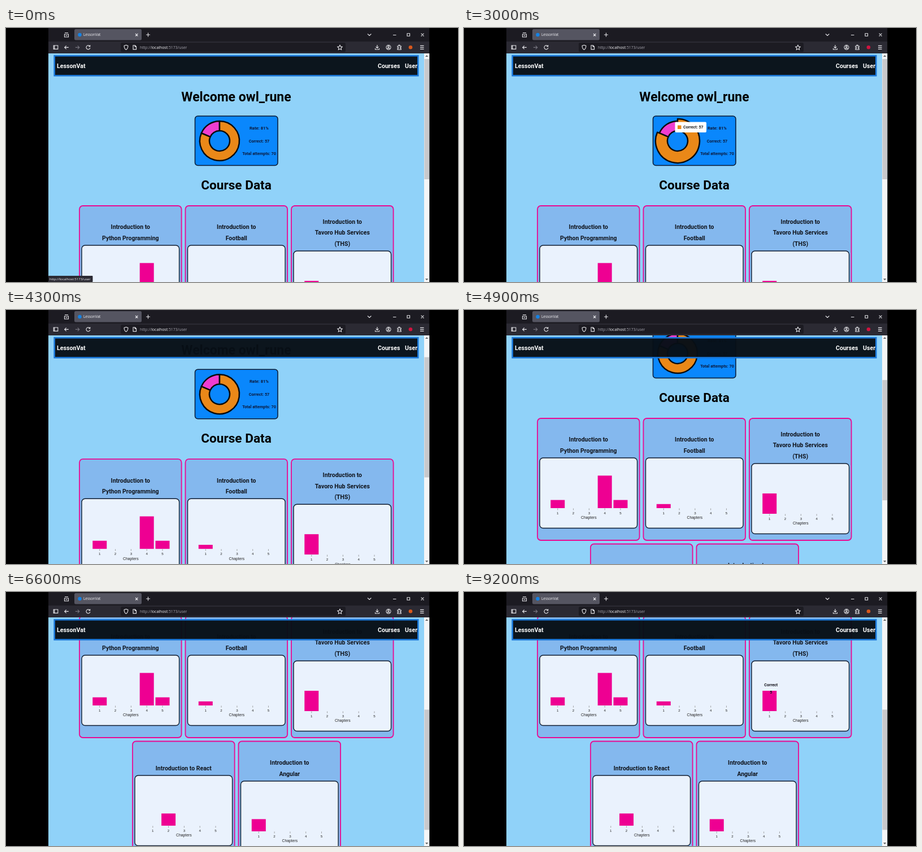
Recreate the animation shown at these times as an HTML page. Size 800 by 450 pixels, loop 9300 ms.

```html
<!DOCTYPE html>
<html lang="en">
<head>
<meta charset="utf-8">
<title>Course dashboard</title>
<style>
  html, body { margin: 0; width: 100%; height: 100%; overflow: hidden; background: #000; }
  svg { display: block; width: 800px; height: 450px; }
  text { font-family: Roboto, sans-serif; font-weight: 700; white-space: pre; }
  .ui { font-family: "Open Sans", sans-serif; font-weight: 400; }
  .axis { font-family: "Liberation Sans", Arial, sans-serif; font-weight: 400; }
  .icon { fill: none; stroke: #e6e6ea; stroke-width: 1.1; }
</style>
</head>
<body>
<svg id="stage" viewBox="0 0 800 450"></svg>
<script>
const LOOP = 9300, STEP = 100, UNIT = 7.2, END = 273;
const PIE = { x: 378, y: 200, inner: 18, outer: 35, share: 57 / 70 };
const $ = id => document.getElementById(id);

const cards = [
  { x: 130, y: 315, title: ["Introduction to", "Python Programming"], top: 385, data: [2, 0, 0, 8, 2] },
  { x: 317.5, y: 315, title: ["Introduction to", "Football"], top: 385, data: [1, 0, 0, 0, 0] },
  { x: 505, y: 315, title: ["Introduction to", "Tavoro Hub Services", "(THS)"], top: 395, data: [5, 0, 0, 0, 0] },
  { x: 224, y: 537.5, title: ["Introduction to React"], top: 598, data: [0, 3, 0, 0, 0] },
  { x: 411.5, y: 537.5, title: ["Introduction to", "Angular"], top: 608, data: [3, 0, 0, 0, 0] }
];

// [time, scroll offset]
const scrollKeys = [[3700, 0], [4000, 25], [4500, 68], [4900, 123], [5400, 257], [5500, 266], [5700, END]];
// [from, to, card, bar]
const hovers = [[6300, 6600, 0, 0], [6900, 7300, 0, 3], [7300, 7600, 0, 4], [8000, 8300, 1, 0], [8800, LOOP, 2, 0]];

const rect = (x, y, w, h, fill, more = "") =>
  `<rect x="${x}" y="${y}" width="${w}" height="${h}" fill="${fill}" ${more}/>`;
const text = (x, y, str, size, more = "") =>
  `<text x="${x}" y="${y + size * 0.36}" font-size="${size}" ${more}>${str}</text>`;
const mid = (x, y, str, size, more = "") => text(x, y, str, size, `text-anchor="middle" ${more}`);
const icon = (d, more = "") => `<path class="icon" d="${d}" ${more}/>`;

const barX = (card, i) => card.x + 23.3 + i * 27.8;
const barTop = (card, i) => card.top + 89 - card.data[i] * UNIT;

function ringSlice(from, to, outer) {
  const at = (turn, r) => {
    const a = turn * 2 * Math.PI;
    return `${PIE.x + r * Math.sin(a)} ${PIE.y - r * Math.cos(a)}`;
  };
  const large = to - from > 0.5 ? 1 : 0, r = PIE.inner;
  return `M${at(from, outer)}A${outer} ${outer} 0 ${large} 1 ${at(to, outer)}` +
         `L${at(to, r)}A${r} ${r} 0 ${large} 0 ${at(from, r)}Z`;
}

function cardSvg(card) {
  const cx = card.x + 90.3, n = card.title.length;
  const lines = card.title.map((s, i) => mid(cx, card.top - 13 - (n - 1 - i) * 19.4, s, 10.5, 'fill="#10141c"'));
  const bars = card.data.map((v, i) => {
    const x = barX(card, i), c = x + 12.5, base = card.top + 89;
    return rect(x, barTop(card, i), 25, v * UNIT, "#ee0092") +
      `<path d="M${c} ${base + 0.5}v3" stroke="#888" stroke-width=".8"/>` +
      mid(c, base + 8.5, i + 1, 6.2, 'class="axis" fill="#222"');
  });
  return rect(card.x, card.y, 180.6, 216, "#84b8ee", 'rx="6" stroke="#ea0a92" stroke-width="1.8"') +
    lines.join("") +
    rect(card.x + 4, card.top, 172.6, 124.5, "#eaf2fd", 'rx="6" stroke="#111d30" stroke-width="1.4"') +
    bars.join("") + mid(cx + 0.5, card.top + 106, "Chapters", 6.8, 'class="axis" fill="#222"');
}

function pageSvg() {
  const stat = 'fill="#0c1a3c"';
  return mid(407.5, 122, "Welcome owl_rune", 23) +
    rect(334.5, 156, 146.5, 87.5, "#0a87fc", 'rx="5" stroke="#0a1830" stroke-width="1.5"') +
    `<g stroke="#0c0c0c" stroke-width="2.5" stroke-linejoin="round">
       <path d="${ringSlice(PIE.share, 1, PIE.outer)}" fill="#ee3dd0"/>
       <path id="slice" fill="#ea8818"/></g>` +
    mid(448, 177, "Rate: 81%", 7.6, stat) +
    mid(448, 200.5, "Correct: 57", 7.3, stat) +
    mid(448, 222, "Total attempts: 70", 7.3, stat) +
    mid(407.5, 278, "Course Data", 22.6) +
    cards.map(cardSvg).join("") +
    `<g id="tip">${rect(373.5, 166.5, 55.5, 18.5, "#fff", 'rx="2"')}${rect(378, 172.5, 6.5, 6.5, "#ea8818")}` +
    text(388, 175.5, "Correct: 57", 7.1, 'fill="#222"') + "</g>" +
    `<g id="label" fill="#15151c">${mid(0, -11, "Correct", 7.2)}<g id="value"></g></g>`;
}

function browserSvg() {
  const nav = 'fill="#fff"';
  return rect(740, 45, 9.5, 405, "#f4f5f7") + rect(740.5, 55, 8.5, 213, "#c8c9cc", 'id="thumb"') +
    `<path d="M742 51l2.7-3 2.7 3zM742 444l2.7 3 2.7-3z" fill="#666"/>` +
    rect(85.7, 49.2, 643.6, 35.2, "#080f16", 'fill-opacity=".97" stroke="#1976d8" stroke-width="2.6"') +
    text(90, 67.5, "LessonVat", 10.7, nav) + text(658, 67.5, "Courses", 10.6, nav) +
    text(706, 67.5, "User", 10.6, nav) +
    rect(75, 0, 674.5, 24, "#1c1b22") + rect(75, 24, 674.5, 21, "#2b2a33") +
    rect(121, 2, 119, 19.5, "#555561", 'rx="2.5"') +
    `<circle cx="130.5" cy="12" r="3.2" fill="#1483e6"/>` +
    text(137, 12, "LessonVat", 6.4, 'class="ui" fill="#f4f4f8"') +
    rect(203, 26, 398, 16.5, "#1c1b22", 'rx="2.5"') +
    text(237, 34.5, 'http://<tspan fill="#f4f4f8">localhost</tspan>:5173/user', 6.9, 'class="ui" fill="#a5a4ae"') +
    icon("M103.5 11h7v5h-7zM104 8.5h6M105.5 13.5h3") +
    icon("M229 10l4.4 4.4m0-4.4L229 14.4M251.5 8.5v7M248 12h7") +
    icon("M640 10.5l3.2 3 3.2-3M685 12.5h5.5M710 9.7h4.6v4.6h-4.6zM734.7 9.7l4.8 4.8m0-4.8l-4.8 4.8") +
    icon("M84.2 31h7.6v6.4h-7.6zM85.7 31v6.4M110.8 34.4h-7M106.7 31.4l-3 3 3 3") +
    icon("M122.8 34.4h7M126.8 31.4l3 3-3 3", 'style="stroke:#777680"') +
    icon("M148.2 32.2a3.5 3.5 0 1 0 .7 2.8M148.8 30.2v2.6h-2.6") +
    icon("M212.5 30.3l3.4 1.2c0 3.6-1 5.6-3.4 6.9c-2.4-1.3-3.4-3.3-3.4-6.9z") +
    icon("M225 30.7h3.4l2.2 2.2v5H225zM228.2 30.7v2.4h2.4") +
    icon("M591 30.2l1.3 2.7 2.9.4-2.1 2.1.5 3-2.6-1.4-2.6 1.4.5-3-2.1-2.1 2.9-.4z") +
    icon("M657 30v5.5M654.6 33.2l2.4 2.4 2.4-2.4M653.5 36v2h7v-2") +
    icon("M681 34.3a4 4 0 1 0-8 0a4 4 0 1 0 8 0M678.4 33a1.4 1.4 0 1 0-2.8 0a1.4 1.4 0 1 0 2.8 0M674.4 37q2.6-2.4 5.2 0") +
    icon("M693 32h2v-1.6h2V32h2.2v2.2h-1.6v2h1.6v2H693v-2h1.5v-2H693z") +
    icon("M733 31.4h6.6M733 34.4h6.6M733 37.4h6.6") +
    `<circle id="badge" cx="716" cy="34.2" r="3.3"/>` +
    `<g id="status">${rect(75, 439, 78.5, 11, "#2b2a33", 'rx="1"')}` +
    text(77, 444.7, "http://localhost:5173/user", 6, 'class="ui" fill="#f4f4f8"') + "</g>" +
    rect(0, 0, 75, 450, "#000") + rect(749.5, 0, 50.5, 450, "#000");
}

function scrollAt(t) {
  const i = scrollKeys.findIndex(k => k[0] > t);
  if (i === 0) return 0;
  if (i < 0) return END;
  const [t0, a] = scrollKeys[i - 1], [t1, b] = scrollKeys[i];
  return a + (b - a) * (t - t0) / (t1 - t0);
}

const show = (id, on) => $(id).setAttribute("visibility", on ? "visible" : "hidden");
const clamp = v => Math.max(0, Math.min(1, v));

function draw(now) {
  const t = Math.floor(now % LOOP / STEP) * STEP;
  const scroll = scrollAt(t);
  $("page").setAttribute("transform", `translate(0 ${-scroll})`);
  $("thumb").setAttribute("y", 55 + scroll * 0.562);

  const grow = clamp((t - 2500) / 300) * clamp((3700 - t) / 200);
  $("slice").setAttribute("d", ringSlice(0, PIE.share, PIE.outer + 4 * grow));
  show("tip", t >= 2600 && t < 3600);
  show("status", t < 300);
  $("badge").setAttribute("fill", t >= 1500 && t < 6200 ? "#d0143f" : "#d9581c");

  const hover = hovers.find(([from, to]) => t >= from && t < to);
  show("label", hover);
  if (hover) {
    const card = cards[hover[2]], i = hover[3];
    $("label").setAttribute("transform", `translate(${barX(card, i) + 15} ${barTop(card, i)})`);
    $("value").innerHTML = mid(0, 2, card.data[i], 7.2);
  }
  requestAnimationFrame(() => draw(performance.now() - start));
}

$("stage").innerHTML = rect(75, 45, 674.5, 405, "#90d2f9") + `<g id="page">${pageSvg()}</g>` + browserSvg();
const start = performance.now();
draw(0);
</script>
</body>
</html>
```
